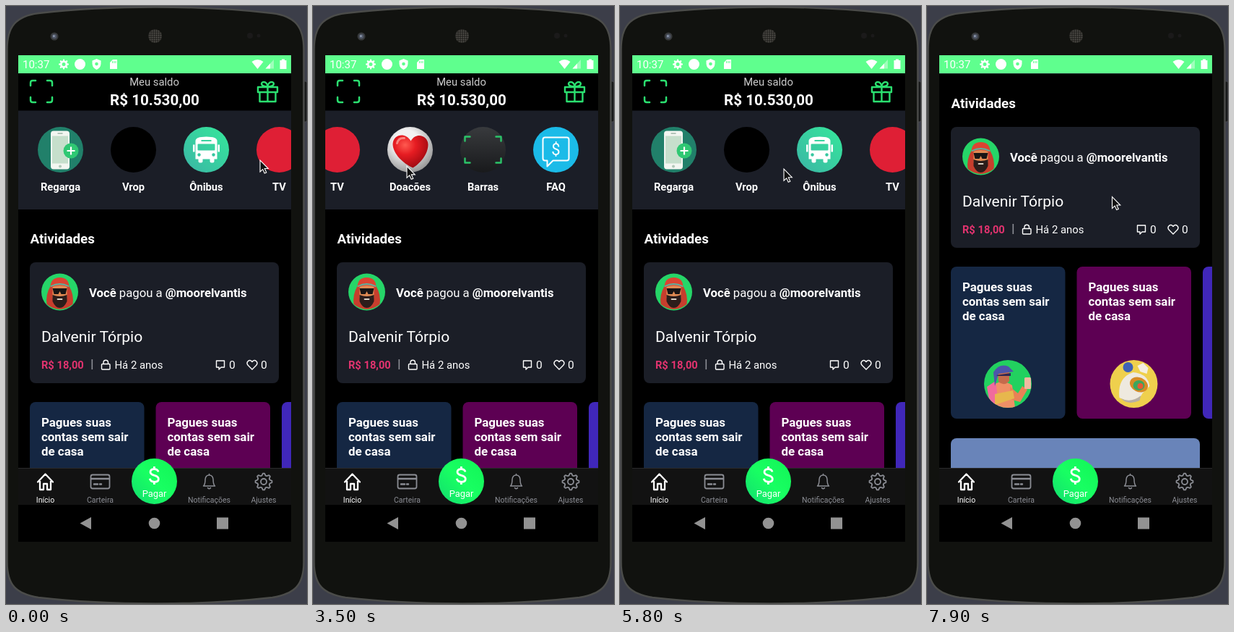
These frames come from a looping animation (417 px wide and 826 px high, 8000 ms). An HTML page:

```html
<!DOCTYPE html>
<html lang="pt-BR">
<head>
<meta charset="utf-8">
<title>Carteira</title>
<style>
html, body { margin: 0; width: 100%; height: 100%; overflow: hidden; background: #3c3e49; }
svg { display: block; width: 100vw; height: 100vh; }
text { font-family: Roboto, "Noto Sans", sans-serif; fill: #fff; }
.b { font-weight: 700; }
.m { text-anchor: middle; }
.label { font-size: 14.7px; }
.promo { font-size: 16.9px; }
.tab { font-size: 10.5px; fill: #8b8d94; }
.line { fill: none; stroke: #fff; stroke-linecap: round; stroke-linejoin: round; }
</style>
</head>
<body>
<svg viewBox="0 0 417 826" xmlns="http://www.w3.org/2000/svg">
<defs>
  <clipPath id="screen"><rect x="17" y="93" width="378" height="545.5"/></clipPath>
  <clipPath id="face"><circle r="25.5"/></clipPath>
  <clipPath id="pic"><circle r="33"/></clipPath>
  <linearGradient id="teal" x1="1" y1="0" x2="0" y2="1">
    <stop offset="0" stop-color="#35e89b"/><stop offset="1" stop-color="#3bb5a5"/>
  </linearGradient>
  <linearGradient id="pay" x1="1" y1="0" x2="0" y2="1">
    <stop offset="0" stop-color="#12f556"/><stop offset=".5" stop-color="#18ff62"/><stop offset="1" stop-color="#12dc70"/>
  </linearGradient>
  <linearGradient id="dark" x1="0" y1="0" x2="0" y2="1">
    <stop offset="0" stop-color="#383a3d"/><stop offset="1" stop-color="#191a1c"/>
  </linearGradient>
  <radialGradient id="pearl" cx=".42" cy=".35" r=".7">
    <stop offset=".4" stop-color="#f2f2f2"/><stop offset="1" stop-color="#8d8d8d"/>
  </radialGradient>
  <radialGradient id="heart" cx=".35" cy=".3" r=".75">
    <stop offset="0" stop-color="#ff5a50"/><stop offset=".4" stop-color="#e61c22"/><stop offset="1" stop-color="#9c0810"/>
  </radialGradient>
  <pattern id="mesh" width="3" height="3" patternUnits="userSpaceOnUse">
    <circle cx="1.5" cy="1.5" r="1" fill="#55534f"/>
  </pattern>
</defs>

<!-- phone body -->
<rect x="410" y="104" width="7" height="56" rx="2" fill="#191a1b" stroke="#4a4b4e"/>
<path fill="#11120f" stroke="#4b4c4a" stroke-width="2.4"
  d="M1.500 60C1.500 28 14 14 45 10Q120 1.500 207 1.500T369 10C400 14 412.500 28 412.500 60V768C412.500 800 400 812 369 817Q294 825.500 207 825.500T45 817C14 812 1.500 800 1.500 768Z"/>
<circle cx="67" cy="42" r="5.5" fill="#383a3c"/>
<circle cx="67" cy="42" r="3.2" fill="#505868"/>
<circle cx="66.4" cy="41.6" r="1.3" fill="#98a3b8"/>
<circle cx="206.5" cy="41.5" r="9.5" fill="#24231f"/>
<circle cx="206.5" cy="41.5" r="9.5" fill="url(#mesh)"/>
<circle cx="338" cy="41" r="4" fill="#1b1a1a"/>
<circle cx="350" cy="41" r="2.5" fill="#1b1a1a"/>
<rect x="17" y="68" width="378" height="672"/>

<g clip-path="url(#screen)">
  <g id="page">
    <!-- header -->
    <path class="line" style="stroke:#2be070" stroke-width="2.5"
      d="M34 110V106Q34 103 37 103H41M57 103H61Q64 103 64 106V110M64 126V130Q64 133 61 133H57M41 133H37Q34 133 34 130V126"/>
    <path class="line" style="stroke:#2be070" stroke-width="2.4"
      d="M349 112H376V119H349ZM351.5 119V132H373.5V119M362.5 112V132M362.5 111C353 112 352 105 357 105C360 105 362 108 362.5 111C363 108 365 105 368 105C373 105 372 112 362.5 111"/>
    <text class="m" x="205.5" y="110" font-size="14.8" style="fill:#cbcbcb">Meu saldo</text>
    <text class="b m" x="206" y="136.5" font-size="20.6">R$ 10.530,00</text>

    <rect x="17" y="144.5" width="378" height="136.5" fill="#1b1e27"/>
    <g id="row"></g>

    <!-- activity -->
    <text class="b" x="33.5" y="328" font-size="18.8">Atividades</text>
    <rect x="33" y="354" width="345" height="167" rx="8" fill="#1b1e27"/>
    <g transform="translate(74.5 395)">
      <circle r="25.5" fill="#26d568"/>
      <g clip-path="url(#face)">
        <path d="M-13-8Q-20 4-18 17Q-9 24 0 24T18 17Q20 4 13-8Z" fill="#c73e2d"/>
        <path d="M-10-9H10V8Q7 17 0 17T-10 8Z" fill="#e08a52"/>
        <path d="M-10 4Q0 8 10 4V13Q6 22 0 22T-10 13Z" fill="#2c1d1b"/>
        <path d="M-13-6Q-13-20 0-20T13-6Q0-12-13-6Z" fill="#dc4432"/>
        <path class="line" style="stroke:#5cb3a0" stroke-width="1.8" d="M-12-8Q0-14 12-8"/>
        <path d="M-10-5H10L8 3H2L0-1L-2 3H-8Z" fill="#191515"/>
        <path class="line" style="stroke:#d9d0c4" stroke-width="1.8" d="M-3 10H3"/>
      </g>
    </g>
    <text x="115" y="402" font-size="16.7"><tspan class="b">Você</tspan> pagou a <tspan class="b">@moorelvantis</tspan></text>
    <text x="49" y="463.5" font-size="21.1">Dalvenir Tórpio</text>
    <text class="b" x="49" y="501" font-size="14.7" style="fill:#e2336f">R$ 18,00</text>
    <path d="M119.3 488V502" stroke="#8b8d94" stroke-width="1.6"/>
    <path class="line" stroke-width="1.4" d="M133.5 494.5H143Q144 494.5 144 495.5V501Q144 502 143 502H133.5Q132.5 502 132.5 501V495.5Q132.5 494.5 133.5 494.5M135 494.5V492.5A3.25 3.25 0 0 1 141.5 492.5V494.5"/>
    <text x="150.5" y="501" font-size="14.9">Há 2 anos</text>
    <path class="line" stroke-width="1.4" d="M291.5 490H302.5V499H298L295 502V499H291.5Z"/>
    <text x="309" y="501" font-size="15.5">0</text>
    <path class="line" stroke-width="1.4" d="M341 502L335.5 496.5C331.5 492 337.5 486.5 341 491.5C344.5 486.5 350.5 492 346.5 496.5Z"/>
    <text x="353" y="501" font-size="15.5">0</text>

    <!-- promo cards -->
    <g id="promos"></g>
    <g transform="translate(112 709)">
      <circle r="33" fill="#22d15f"/>
      <g clip-path="url(#pic)">
        <path d="M-24 33L-20 2Q-8-8 6 2L10 33Z" fill="#ef8f66"/>
        <path d="M-29 4L-17-4L-13 27L-24 33Z" fill="#f06b9d"/>
        <path d="M3 4L14 13L20 3L27 8L17 25L3 21Z" fill="#e98256"/>
        <path d="M-14-17H2V-4Q-5 4-13-3Z" fill="#c56b4c"/>
        <path d="M-20-16Q-12-29 1-24L8-17L-13-14L-18 3Z" fill="#4d55aa"/>
        <path d="M-16-12L4-15V-11H-14Z" fill="#302754"/>
        <path d="M-18 14L7 9L9 20L-18 29Z" fill="#e7b74d"/>
        <rect x="23" y="-9" width="9" height="16" rx="1.5" fill="#efb9a0"/>
      </g>
    </g>
    <g transform="translate(286.5 709)">
      <circle r="33" fill="#efd04d"/>
      <path d="M-20 19Q-23-9-1-16Q20-14 22 3L12 13Q7 24-8 24Z" fill="#eee9df"/>
      <path d="M-18 20Q-4 27 10 16L8 23Q-8 30-18 20Z" fill="#b8b0a4"/>
      <ellipse cx="7" cy="1" rx="13" ry="10" fill="#d78b26" transform="rotate(25 7 1)"/>
      <ellipse cx="7" cy="2" rx="8" ry="7" fill="#3ba65d"/>
      <circle cx="9" cy="3" r="4" fill="#e45b35"/>
      <circle cx="-8" cy="-23" r="7" fill="#3f62b5"/>
      <path d="M5-25L13-29L20-22L18-14L9-17Z" fill="#f4efe2"/>
    </g>
    <rect x="33" y="784" width="345" height="167" rx="8" fill="#6984b9"/>
  </g>
</g>

<!-- status bar -->
<rect x="17" y="68" width="378" height="25" fill="#5fff8e"/>
<text x="23" y="86" font-size="15">10:37</text>
<path id="cog" fill="#fff" fill-rule="evenodd" transform="translate(80 80.5)"/>
<circle cx="102.5" cy="80.5" r="7.5" fill="#fff"/>
<path d="M125.5 73L131.5 75.5V80Q131 85.5 125.5 88Q120 85.5 119.5 80V75.5Z" fill="#fff"/>
<circle cx="125.5" cy="80" r="2.3" fill="#5fff8e"/>
<path d="M148 74H154V87H144V78Z" fill="#fff"/>
<path d="M147.5 76V79M149.8 76V79M152 76V79" stroke="#5fff8e"/>
<path d="M340.5 77Q348.5 71 356.5 77L348.5 87Z" fill="#fff"/>
<path d="M371 74V86.5H359.5Z" fill="#fff" opacity=".4"/>
<path d="M366 79.5V86.5H359.5Z" fill="#fff"/>
<path d="M382 73.5H386V75H388.5V87H379.5V75H382Z" fill="#fff"/>

<!-- tab bar -->
<rect x="17" y="638" width="378" height="51" fill="#121212"/>
<path d="M17 638.5H395" stroke="#2a2a2b"/>
<path class="line" stroke-width="2.3" d="M44 657.5L54.5 646.5L65 657.5M47 656V668H52V660H57V668H62V656"/>
<g class="line" style="stroke:#8b8d94" stroke-width="1.8">
  <rect x="117.5" y="647.5" width="26" height="19" rx="2.5"/>
  <path d="M118 653H143M122 660.5H127M130 660.5H132" stroke-width="2.4"/>
  <path d="M273.5 663Q276 661 276 654Q276.5 648 281.5 648T287 654Q287 661 289.5 663ZM279.5 665.5Q281.5 668 283.5 665.5M281.5 646.5V648" stroke-width="1.5"/>
  <path id="gear" transform="translate(357 657)"/>
  <circle cx="357" cy="657" r="4"/>
</g>
<g id="tabs"></g>
<circle cx="205.5" cy="656.5" r="31.5" fill="url(#pay)"/>
<path class="line" stroke-width="2.8" style="stroke-linecap:butt" d="M211 643.5Q210 639.7 205.3 639.7Q200 639.7 200 643.8Q200 647 205.5 648.3Q211.3 649.7 211.3 653.2Q211.3 657.3 205.5 657.3Q200 657.3 199.3 652.8M205.4 636V640M205.4 657V661"/>
<text class="m" x="205.5" y="678" font-size="12.9">Pagar</text>

<!-- system keys -->
<g fill="#929292">
  <path d="M102.5 714.5L118 706V723Z"/>
  <circle cx="205.5" cy="714.5" r="7.8"/>
  <rect x="292" y="706.5" width="16" height="16"/>
</g>

<path id="mouse" d="M0 0V16L3.7 12.6L6.2 18L8.8 17L6.3 11.5H11.3Z" fill="#111" stroke="#fff" stroke-width="1.1"/>
</svg>

<script>
const $ = id => document.getElementById(id);

const disc = (fill = "#000") => `<circle r="31.5" fill="${fill}"/>`;

const corners = `<path class="line" style="stroke:#2bc46a" stroke-width="2.4"
  d="M-25-12V-18H-18M18-18H25V-12M25 12V18H18M-18 18H-25V12"/>`;

const phone = disc("#21806a") + `
  <rect x="-13.5" y="-26" width="26" height="53" rx="4" fill="#f3f6f1"/>
  <rect x="-11.5" y="-19" width="22" height="38" fill="#c6dfcc"/>
  <path d="M-4-22.5H3" stroke="#9eb5a7" stroke-width="1.5"/><circle cx="-.5" cy="23" r="2" fill="#b1c8b8"/>
  <circle cx="14.5" cy="1.5" r="10.5" fill="#2fc873"/>
  <path d="M9 1.5H20M14.5-4V7" stroke="#fff" stroke-width="2.2"/>`;

const bus = disc("url(#teal)") + `
  <path fill="#fff" fill-rule="evenodd" d="M0-18Q15-18 15-12V13H11V16Q11 18 9 18H7Q5 18 5 16V13H-5V16Q-5 18-7 18H-9Q-11 18-11 16V13H-15V-12Q-15-18 0-18ZM-11-8Q-12-8-12-7V0Q-12 1-11 1H11Q12 1 12 0V-7Q12-8 11-8ZM-7-13.5V-11.5H7V-13.5Z"/>
  <path d="M-18.5-7H-16V3H-18.5ZM16-7H18.5V3H16Z" fill="#fff"/>
  <circle cx="-10" cy="7" r="2.2" fill="#36c7a0"/><circle cx="10" cy="7" r="2.2" fill="#36c7a0"/>`;

const heart = disc("url(#pearl)") + `
  <path d="M4 25C-10 19-24 5-24-8C-23-22-6-24 1-12C8-25 25-20 25-7C25 6 14 19 4 25Z" fill="url(#heart)"/>
  <path d="M-18-9Q-16-17-8-16" class="line" style="stroke:#ffb3aa" stroke-width="3" opacity=".65"/>`;

const bubble = disc("#1bbbe8") + `
  <path class="line" stroke-width="2" d="M-15-17H15Q18-17 18-14V12Q18 15 15 15H-4L-12 23V15H-15Q-18 15-18 12V-14Q-18-17-15-17Z"/>
  <text class="m" y="7" font-size="22">$</text>`;

const items = [
  ["Regarga", phone],
  ["Vrop", disc()],
  ["Ônibus", bus],
  ["TV", disc("#df1f35")],
  ["Doacões", heart],
  ["Barras", disc("url(#dark)") + corners],
  ["FAQ", bubble]
];
$("row").innerHTML = items.map(([name, art], i) =>
  `<g transform="translate(${75.5 + i * 101} 198.5)">${art}<text class="b m label" y="56.5">${name}</text></g>`).join("");

$("promos").innerHTML = [[33, "#152743"], [207.5, "#5d0053"], [382, "#4027b9"]].map(([x, fill]) =>
  `<rect x="${x}" y="547" width="158.5" height="210" rx="8" fill="${fill}"/>` +
  ["Pagues suas", "contas sem sair", "de casa"].map((s, i) =>
    `<text class="b promo" x="${x + 16}" y="${581 + i * 20}">${s}</text>`).join("")).join("");

$("tabs").innerHTML = [["Início", 54.5], ["Carteira", 130.5], ["Notificações", 281.5], ["Ajustes", 357]].map(([s, x], i) =>
  `<text class="m tab" x="${x}" y="686"${i ? "" : ' style="fill:#fff"'}>${s}</text>`).join("");

// Outline of a cog with eight teeth
function cog(inner, outer) {
  const pts = [];
  for (let i = 0; i < 32; i++) {
    const a = (i - 0.5) * Math.PI / 16, r = i % 4 < 2 ? outer : inner;
    pts.push((r * Math.cos(a)).toFixed(2) + " " + (r * Math.sin(a)).toFixed(2));
  }
  return "M" + pts.join("L") + "Z";
}
$("gear").setAttribute("d", cog(8.8, 11.5));
$("cog").setAttribute("d", cog(5, 7) + "M-2.5 0A2.5 2.5 0 1 0 2.5 0A2.5 2.5 0 1 0-2.5 0Z");

// Motion tables: [time, value...]
const pan = [[600, 0], [800, 25], [1000, 70], [1200, 118.5], [1400, 167], [1600, 190], [2100, 190], [2300, 232],
  [2500, 289], [2700, 345], [3700, 345], [4000, 270], [4300, 185.5], [4500, 110], [4700, 66], [4900, 62.5],
  [5000, 62.5], [5200, 35], [5500, 1]];
const lift = [[7300, 0], [7500, 45], [7700, 122], [7900, 187]];
const pointer = [[400, 352, 213], [600, 335, 213], [1200, 165, 212.5], [1400, 128, 212], [1600, 118, 211],
  [1700, 118, 211], [2100, 365, 207], [2500, 226, 204.5], [2700, 150, 206], [3000, 110, 212], [3400, 120, 220],
  [3700, 150, 224], [4300, 333, 225.5], [4600, 398, 232], [5000, 86.5, 239.5], [5500, 245, 230],
  [6000, 215, 222], [6500, 190, 217], [6900, 190, 217], [7300, 262, 480], [7900, 256.5, 263.5]];
const press = {
  3: [[1000, 1], [1100, 0.2], [1200, 0.38], [1300, 0.75], [1400, 1]],
  5: [[2300, 1], [2400, 0.2], [2500, 0.45], [2600, 0.8], [2700, 1]],
  1: [[6600, 1], [6700, 0.2], [6900, 0.2], [7100, 1]]
};

function at(table, t, k = 1) {
  const i = table.findIndex(row => row[0] > t);
  if (i === 0) return table[0][k];
  if (i < 0) return table[table.length - 1][k];
  const a = table[i - 1], b = table[i];
  return a[k] + (b[k] - a[k]) * (t - a[0]) / (b[0] - a[0]);
}

const move = (id, x, y) => $(id).setAttribute("transform", `translate(${x} ${y})`);
const start = performance.now();

function draw(now) {
  const t = Math.floor(Math.max(0, now - start) % 8000 / 100) * 100;
  move("row", -at(pan, t), 0);
  move("page", 0, -at(lift, t));
  move("mouse", at(pointer, t), at(pointer, t, 2));
  for (const i in press) $("row").children[i].setAttribute("opacity", at(press[i], t));
  requestAnimationFrame(draw);
}
draw(start);
</script>
</body>
</html>
```
